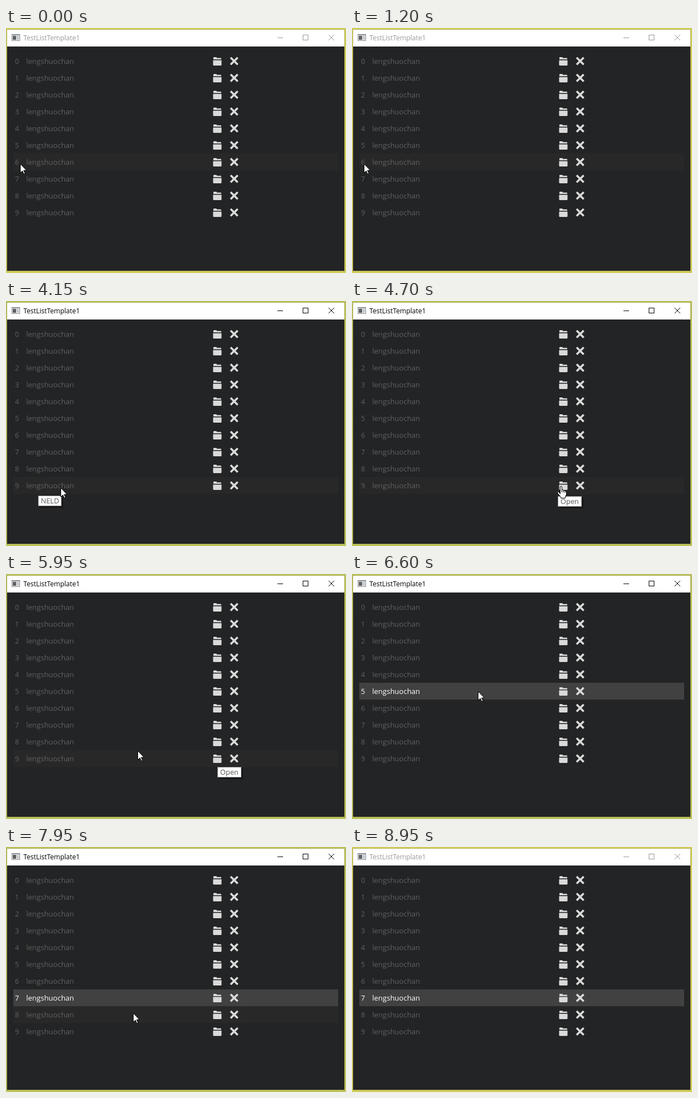
An HTML page with a canvas for the animation above (9000 ms loop, 605 by 437 pixels).

```html
<!DOCTYPE html>
<html lang="en">
<head>
<meta charset="utf-8">
<title>List window</title>
<style>
html, body { margin: 0; width: 100%; height: 100%; overflow: hidden; background: #c4c658; }
canvas { display: block; }
</style>
</head>
<body>
<canvas id="stage" width="605" height="437"></canvas>
<script>
const ctx = document.getElementById('stage').getContext('2d');
const LOOP = 9000, STEP = 50, ACTIVATE = 2800, LEAVE = 8950;
const FONT = '"Open Sans", "Noto Sans", sans-serif';
const TITLE = 'TestListTemplate1', NAME = 'lengshuochan';
const ROW_TOP = 44, ROW_H = 30, ROWS = 10;

// Pointer moves; it rests between them
const home = { x: 25, y: 242 };
const moves = [
  { from: 50, to: 100, x: 23, y: 242 },
  { from: 1150, to: 1200, x: 21, y: 242 },
  { from: 2000, to: 2500, x: 43, y: 379 },
  { from: 2750, to: 3200, x: 55, y: 326 },
  { from: 4100, to: 4150, x: 97, y: 333 },
  { from: 4150, to: 4600, x: 364, y: 327 },
  { from: 4600, to: 4700, x: 371, y: 330 },
  { from: 5100, to: 5300, x: 396, y: 325 },
  { from: 5750, to: 5850, x: 374, y: 323 },
  { from: 5850, to: 5950, x: 234, y: 315 },
  { from: 5950, to: 6450, x: 224, y: 209 },
  { from: 7000, to: 7350, x: 223, y: 282 },
  { from: 7900, to: 8100, x: 236, y: 336 },
  { from: 8250, to: 8400, x: 268, y: 399 }
];

// A tip opens beside the pointer and stays there
const tips = [
  { from: 3750, to: 4500, label: 'NELD' },
  { from: 4600, to: 5200, label: 'Open' },
  { from: 5250, to: 5850, label: 'Delete' },
  { from: 5850, to: 6600, label: 'Open' }
];

const clicks = [6600, 7600];

function pointerAt(t) {
  let { x, y } = home;
  for (const m of moves) {
    if (t <= m.from) break;
    const k = Math.min(1, (t - m.from) / (m.to - m.from));
    x += (m.x - x) * k;
    y += (m.y - y) * k;
  }
  return { x: Math.round(x), y: Math.round(y) };
}

function rowAt(y) {
  const r = Math.floor((y - ROW_TOP) / ROW_H);
  return r >= 0 && r < ROWS ? r : -1;
}

function selectedAt(t) {
  const last = clicks.filter(c => c <= t).pop();
  return last ? rowAt(pointerAt(last).y) : -1;
}

function rect(x, y, w, h, color) {
  ctx.fillStyle = color;
  ctx.fillRect(x, y, w, h);
}

function text(s, x, y, size, color) {
  ctx.font = size + 'px ' + FONT;
  ctx.fillStyle = color;
  ctx.fillText(s, x, y);
}

function cross(cx, cy, r, color, width) {
  ctx.strokeStyle = color;
  ctx.lineWidth = width;
  ctx.beginPath();
  for (const s of [-1, 1]) {
    ctx.moveTo(cx - r, cy - r * s);
    ctx.lineTo(cx + r, cy + r * s);
  }
  ctx.stroke();
}

function drawWindow(active) {
  rect(0, 0, 605, 437, active ? '#bdc25a' : '#d0cd5a');
  rect(1, 2, 602, 432, active ? '#a5a952' : '#b3b056');
  rect(2, 3, 600, 30, '#ffffff');
  rect(2, 33, 600, 400, '#232425');

  rect(10, 11, 15, 12, '#8b8e91');
  rect(11, 13, 13, 9, '#eceef0');
  rect(12, 14, 6, 7, '#5c6063');
  rect(19, 14, 4, 7, '#c5c9cc');

  const ink = active ? '#000000' : '#999999';
  text(TITLE, 31, 22, 12, ink);
  rect(483, 17, 10, 1, ink);
  cross(579, 17, 5, ink, 1);
  ctx.strokeRect(528.5, 12.5, 9, 9);
}

function drawFolder(x, y) {
  ctx.fillStyle = '#dadada';
  ctx.beginPath();
  ctx.roundRect(x + 1, y, 6, 4, 1);
  ctx.roundRect(x + 1, y + 1.5, 14, 2.5, [0, 1, 0, 0]);
  ctx.roundRect(x + 0.5, y + 5.5, 15, 9.5, [0, 0, 1.5, 1.5]);
  ctx.fill();
}

function drawRow(i, hovered, selected) {
  const y = ROW_TOP + i * ROW_H;
  if (selected) rect(13, y, 578, ROW_H, '#414141');
  else if (hovered) rect(13, y, 578, ROW_H, '#282829');
  const ink = selected ? '#ffffff' : '#606060';
  text(i, 16, y + 20, 12.5, ink);
  text(NAME, 36, y + 20, 13, ink);
  drawFolder(368, y + 8);
  cross(406, y + 15, 6.3, '#dadada', 3.6);
}

function drawTip(tip, t) {
  const p = pointerAt(tip.from), x = p.x + 2, y = p.y + 21;
  ctx.font = '12.7px ' + FONT;
  const w = Math.round(ctx.measureText(tip.label).width) + 10;
  ctx.globalAlpha = t < tip.from + STEP ? 0.5 : 1;
  rect(x + 3, y + 3, w, 19, 'rgba(0,0,0,.35)');
  rect(x, y, w, 19, '#767676');
  rect(x + 1, y + 1, w - 2, 17, '#ffffff');
  text(tip.label, x + 5, y + 14, 12.7, '#575757');
  ctx.globalAlpha = 1;
}

const arrow = new Path2D('M.5 .5V16.5L4.2 12.9L6.8 18.5L9 17.5L6.5 12H11.5Z');
const hand = new Path2D('M5.5 14V2Q5.5 .5 7 .5T8.5 2V7Q9 6 10 6.3T11.2 8Q13.5 7 14 9Q16.5 8.2 16.5 11V15.5' +
  'L14.5 19V21.5H6.5V19.5L1 13Q.2 11.5 1.5 10.8T4 12Z M8.5 7V11M11.3 8V11.5M14 9V12');

function drawPointer({ x, y }, isHand) {
  const shape = isHand ? hand : arrow;
  ctx.save();
  ctx.translate(isHand ? x - 6 : x, y);
  ctx.fillStyle = '#ffffff';
  ctx.strokeStyle = '#000000';
  ctx.lineWidth = 1;
  ctx.fill(shape);
  ctx.stroke(shape);
  ctx.restore();
}

function render(now) {
  const t = Math.floor((now % LOOP) / STEP) * STEP;
  const present = t < LEAVE;
  const pointer = pointerAt(t);
  const hover = present ? rowAt(pointer.y) : -1;
  const selected = selectedAt(t);

  drawWindow(present && t >= ACTIVATE);
  for (let i = 0; i < ROWS; i++) drawRow(i, i === hover, i === selected);
  for (const tip of tips) if (t >= tip.from && t < tip.to) drawTip(tip, t);
  if (present) drawPointer(pointer, hover >= 0 && pointer.x >= 362);
}

const start = performance.now();
function loop() {
  render(performance.now() - start);
  requestAnimationFrame(loop);
}
loop();
</script>
</body>
</html>
```
